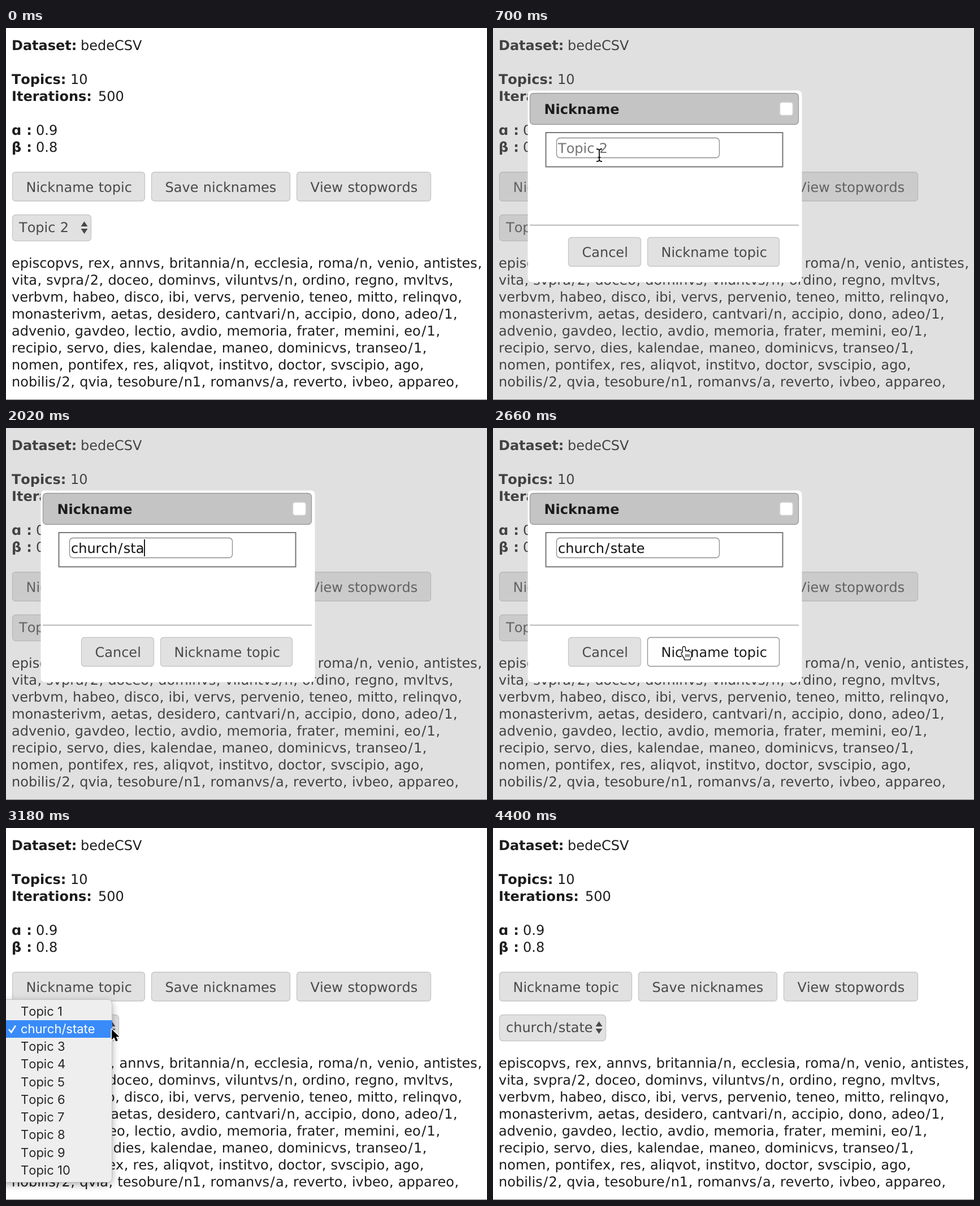
Recreate the animation shown at these times as an HTML page with a canvas. Size 851x658 px, loop 4.72 s.

```html
<!DOCTYPE html>
<html lang="en">
<head>
<meta charset="utf-8">
<title>Nickname a topic</title>
<style>
  html, body { margin: 0; width: 100%; height: 100%; overflow: hidden; background: #fff; }
  canvas { display: block; }
</style>
</head>
<body>
<canvas id="stage" width="851" height="658"></canvas>
<script>
const stage = document.getElementById('stage');
const LOOP = 4720;
const DIALOG_OPEN = 380, CARET_ON = 920, CARET_OFF = 2640, DIALOG_CLOSE = 2700;
const MENU_OPEN = 3140, MENU_FADE = 3880, MENU_GONE = 4075;

const REGULAR = '24px "DejaVu Sans", Verdana, sans-serif';
const BOLD = 'bold ' + REGULAR;
const MENU_FONT = '22px Inter, "Open Sans", sans-serif';
const INK = '#1c1c1c', LABEL = '#494949', BUTTON = '#e1e1e1';

const NICKNAME = 'church/state';
const KEY_TIMES = [1080, 1140, 1220, 1290, 1360, 1440, 1720, 1800, 1900, 2020, 2080, 2140];

const FACTS = [
  ['Dataset:', 'bedeCSV', 132, 39],
  ['Topics:', '10', 114, 99],
  ['Iterations:', '500', 163, 129],
  ['ɑ :', '0.9', 53, 189],
  ['β :', '0.8', 53, 219]
];

const WORDS = [
  'episcopvs, rex, annvs, britannia/n, ecclesia, roma/n, venio, antistes,',
  'vita, svpra/2, doceo, dominvs, viluntvs/n, ordino, regno, mvltvs,',
  'verbvm, habeo, disco, ibi, vervs, pervenio, teneo, mitto, relinqvo,',
  'monasterivm, aetas, desidero, cantvari/n, accipio, dono, adeo/1,',
  'advenio, gavdeo, lectio, avdio, memoria, frater, memini, eo/1,',
  'recipio, servo, dies, kalendae, maneo, dominicvs, transeo/1,',
  'nomen, pontifex, res, aliqvot, institvo, doctor, svscipio, ago,',
  'nobilis/2, qvia, tesobure/n1, romanvs/a, reverto, ivbeo, appareo,'
];

// Pointer stops: time, x, y
const POINTER = [
  [0, -20, 322], [20, -20, 322], [300, 165, 283], [400, 165, 283], [700, 188, 225],
  [2280, 188, 225], [2600, 338, 387], [2920, 338, 387], [3110, 187, 356],
  [4110, 187, 356], [4280, -20, 345], [LOOP, -20, 345]
];

const ARROW = new Path2D('M0 0V18.5L4.3 14.6L7.4 21.6L10.8 20.1L7.8 13.2H13.4Z');
const HAND = new Path2D('M-2 2.5Q-2 0 0 0Q2 0 2 2.5V8Q4 6.5 5.5 8.6Q7.6 7.2 9 9.4Q12.6 8.6 12.6 12V15Q12.6 18 10.6 20V22.5H1V20Q-1 18-3.5 13.5Q-5 10.5-3.5 10Q-2.8 9.8-2 11Z');
const HAND_FOLDS = new Path2D('M3.3 13V18M6 13V18M8.7 13V18');
const BEAM = new Path2D('M-5-11Q0-11 0-8Q0-11 5-11M-5 11Q0 11 0 8Q0 11 5 11M0-8V8M-2.5 4H2.5');

function context(canvas) {
  const c = canvas.getContext('2d');
  c.fontKerning = 'none';
  c.textRendering = 'geometricPrecision';
  return c;
}

let ctx = context(stage);

// Wide slashes and commas give the looser rhythm of the page's typeface.
function text(str, x, y, color = INK, font = REGULAR) {
  ctx.font = font;
  ctx.fillStyle = color;
  ctx.wordSpacing = '0.8px';
  for (const part of str.split(/([\/,])/)) {
    const pad = part === '/' ? 2.8 : part === ',' ? 1.1 : 0;
    ctx.fillText(part, x + pad / 2, y);
    x += ctx.measureText(part).width + pad;
  }
  return x;
}

function box(x, y, w, h, radius, fill, stroke, line = 1) {
  ctx.beginPath();
  ctx.roundRect(x + 0.5, y + 0.5, w - 1, h - 1, radius);
  ctx.fillStyle = fill;
  ctx.fill();
  if (stroke) {
    ctx.strokeStyle = stroke;
    ctx.lineWidth = line;
    ctx.stroke();
  }
}

function rect(x, y, w, h, color) {
  ctx.fillStyle = color;
  ctx.fillRect(x, y, w, h);
}

function button(label, x, y, w, hover) {
  box(x, y, w, 52, 5, hover ? '#fff' : BUTTON, hover ? '#8f8f8f' : '#c6c6c6', 1.3);
  text(label, x + 24.5, Math.round(y + 35), hover ? INK : LABEL);
}

function select(label, w) {
  box(11, 330, w, 47, 6, BUTTON, '#c6c6c6', 1.3);
  text(label, 23, 361, LABEL);
  const x = 11 + w - 12.5;
  ctx.beginPath();
  for (const dir of [-1, 1]) {
    const y = 353 + dir * 2;
    ctx.moveTo(x - 6, y);
    ctx.lineTo(x + 6, y);
    ctx.lineTo(x, y + dir * 9);
  }
  ctx.fill();
}

function page(t, over) {
  rect(0, 0, 851, 658, '#fff');
  for (const [name, value, x, y] of FACTS) {
    text(name, 10, y, INK, BOLD);
    text(value, x, y);
  }
  button('Nickname topic', 11, 254.5, 235, over === 'open');
  button('Save nicknames', 257, 254.5, 246);
  button('View stopwords', 514, 254.5, 238);
  if (t < DIALOG_CLOSE) select('Topic 2', 140);
  else select(NICKNAME, 189);
  WORDS.forEach((line, i) => text(line, 10, 424 + i * 30));
  rect(0, 657, 851, 1, '#777');
}

function dialog(t, over) {
  rect(0, 0, 851, 657, 'rgba(152,152,152,.3)');
  box(61, 110, 486, 340, 7, '#fff');
  box(65, 115, 476, 56, 6, '#c4c4c4', '#999', 1.3);
  text('Nickname', 90.5, 152, INK, BOLD);
  box(507, 131, 24, 24, 4, '#fff', '#d2d2d2', 1.5);
  ctx.strokeStyle = '#777';
  ctx.lineWidth = 2;
  ctx.strokeRect(93.5, 185, 419, 60.5);
  box(112, 194, 289, 36, 6, '#fff', '#8a8a8a', 1.3);

  const typed = NICKNAME.slice(0, KEY_TIMES.filter(k => k <= t).length);
  const end = text(typed, 115, 221, '#111');
  if (!typed) text('Topic 2', 115, 221, '#747474');
  if (t >= CARET_ON && t < CARET_OFF) rect(Math.round(end), 197, 2, 30, '#222');

  rect(65, 348, 476, 1.3, '#999');
  button('Cancel', 133, 370, 129);
  button('Nickname topic', 273, 370, 234, over === 'save');
}

function menu() {
  ctx.shadowColor = 'rgba(0,0,0,.35)';
  ctx.shadowBlur = 14;
  ctx.shadowOffsetY = 4;
  box(-10, 303, 198, 324, 7, '#eee');
  ctx.shadowColor = 'transparent';
  box(-10, 303, 198, 324, 7, '#eee', '#c4c4c4');
  rect(0, 340, 188, 31, '#398bf9');
  ctx.font = MENU_FONT;
  for (let i = 0; i < 10; i++) {
    ctx.fillStyle = i === 1 ? '#fff' : '#262626';
    ctx.fillText(i === 1 ? NICKNAME : 'Topic ' + (i + 1), 26, Math.floor(332 + i * 31.25));
  }
  ctx.strokeStyle = '#fff';
  ctx.lineWidth = 2.6;
  ctx.stroke(new Path2D('M5 356L9.3 361.5L17 349.5'));
}

// Painted once on its own layer so that it fades as a whole.
function paintLayer(paint) {
  const layer = document.createElement('canvas');
  layer.width = stage.width;
  layer.height = stage.height;
  const screen = ctx;
  ctx = context(layer);
  paint();
  ctx = screen;
  return layer;
}

function pointerAt(t) {
  const i = Math.max(1, POINTER.findIndex(stop => stop[0] > t));
  const [t0, x0, y0] = POINTER[i - 1], [t1, x1, y1] = POINTER[i];
  const p = (t - t0) / (t1 - t0), e = p * p * (3 - 2 * p);
  return [x0 + (x1 - x0) * e, y0 + (y1 - y0) * e];
}

function target(t, x, y) {
  const inside = (l, top, r, b) => x >= l && x <= r && y >= top && y <= b;
  if (t >= DIALOG_OPEN && t < DIALOG_CLOSE) {
    if (inside(112, 194, 401, 230)) return 'input';
    if (inside(273, 370, 507, 422)) return 'save';
  } else if (t < DIALOG_OPEN && inside(11, 254, 246, 306)) return 'open';
  return '';
}

function outlined(path, fill, stroke, line) {
  ctx.lineWidth = line;
  ctx.strokeStyle = stroke;
  ctx.stroke(path);
  ctx.fillStyle = fill;
  ctx.fill(path);
}

function pointer(x, y, over) {
  ctx.save();
  ctx.translate(x, y);
  ctx.lineJoin = 'round';
  if (over === 'input') {
    for (const [color, width] of [['#fff', 4], ['#111', 1.8]]) {
      ctx.strokeStyle = color;
      ctx.lineWidth = width;
      ctx.stroke(BEAM);
    }
  } else if (over) {
    outlined(HAND, '#fff', '#111', 2.6);
    ctx.lineWidth = 1.2;
    ctx.stroke(HAND_FOLDS);
  } else {
    outlined(ARROW, '#000', '#fff', 3);
  }
  ctx.restore();
}

const menuLayer = paintLayer(menu);

function draw(t) {
  const [x, y] = pointerAt(t);
  const over = target(t, x, y);
  page(t, over);
  if (t >= DIALOG_OPEN && t < DIALOG_CLOSE) dialog(t, over);
  if (t >= MENU_OPEN && t < MENU_GONE) {
    ctx.globalAlpha = Math.min(1, (MENU_GONE - t) / (MENU_GONE - MENU_FADE));
    ctx.drawImage(menuLayer, 0, 0);
    ctx.globalAlpha = 1;
  }
  const hiddenByTyping = t >= KEY_TIMES[0] && t < 2280;
  if (!hiddenByTyping) pointer(x, y, over);
}

const start = performance.now();
function tick() {
  draw((performance.now() - start) % LOOP);
  requestAnimationFrame(tick);
}
tick();
</script>
</body>
</html>
```
